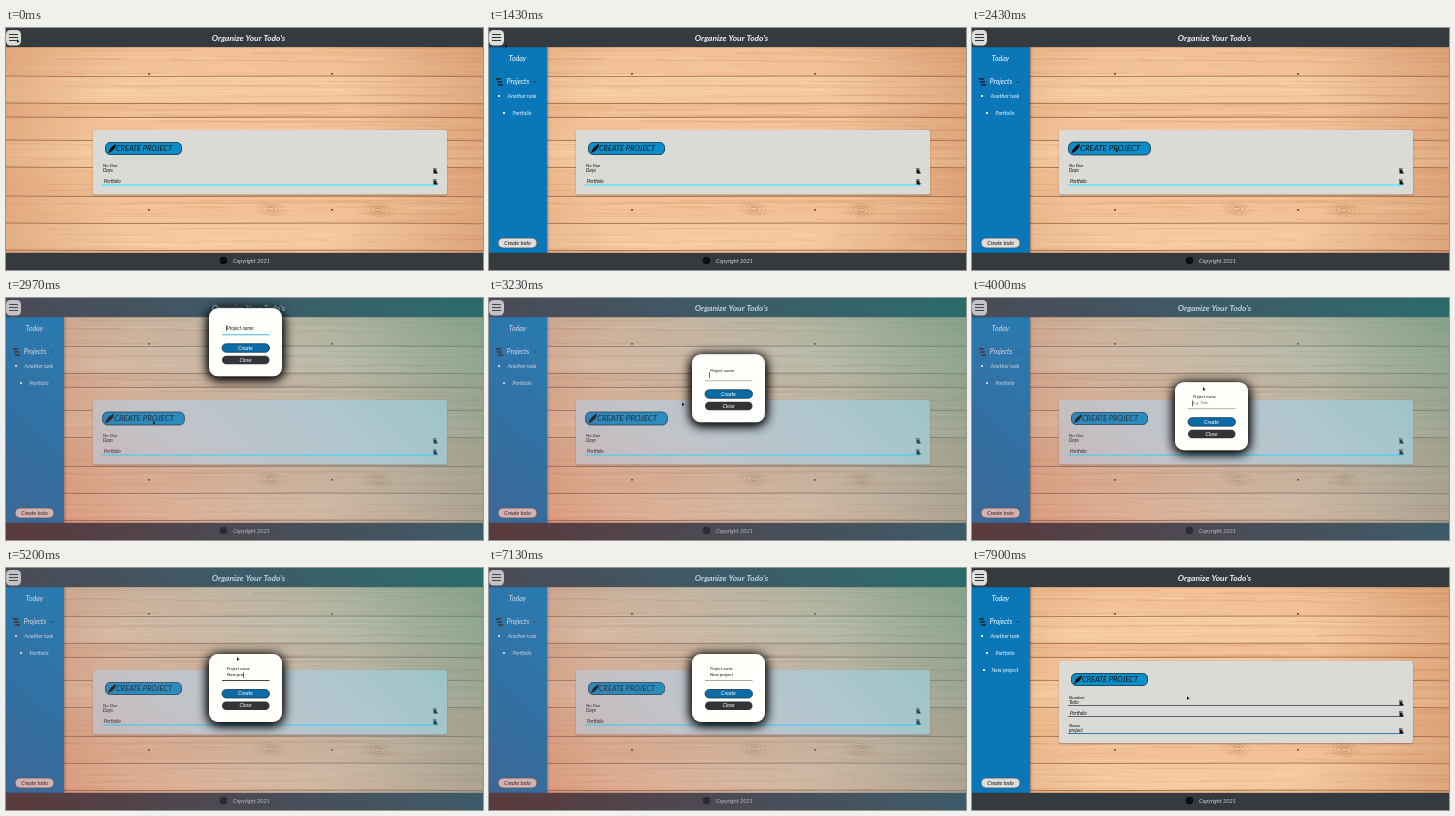
These frames come from a looping animation (477 by 242 pixels, 8000 ms). An HTML page with a canvas:

```html
<!DOCTYPE html>
<html lang="en">
<head>
<meta charset="utf-8">
<title>Todo list</title>
<style>
html, body { margin: 0; width: 100%; height: 100%; overflow: hidden; background: #343a3e; }
canvas { display: block; width: 477px; height: 242px; }
</style>
</head>
<body>
<canvas id="stage" width="477" height="242"></canvas>
<script>
const W = 477, H = 242, LOOP = 8000;
const SAVED = 7200; // the new project appears and the dialog closes
const c = document.getElementById('stage').getContext('2d');

const clamp = x => Math.max(0, Math.min(1, x));
const part = (t, a, b) => clamp((t - a) / (b - a));
const smooth = x => x * x * (3 - 2 * x);
const mix = (a, b, p) => a + (b - a) * p;

function rect(x, y, w, h, color) {
  c.fillStyle = color;
  c.fillRect(x, y, w, h);
}

function pill(x, y, w, h, r, fill, stroke) {
  c.beginPath();
  c.roundRect(x, y, w, h, r);
  c.fillStyle = fill;
  c.fill();
  if (stroke) {
    c.strokeStyle = stroke;
    c.lineWidth = .8;
    c.stroke();
  }
}

function text(s, x, y, size, color, align = 'left', weight = 400) {
  c.font = `italic ${weight} ${size}px Lato, "Open Sans", sans-serif`;
  c.textAlign = align;
  c.textBaseline = 'middle';
  c.fillStyle = color;
  c.fillText(s, x, y);
}

function shadow(color, blur, y = 0) {
  c.shadowColor = color;
  c.shadowBlur = blur;
  c.shadowOffsetY = y;
}

function makeWood() {
  const board = document.createElement('canvas');
  board.width = W;
  board.height = H;
  const g = board.getContext('2d');
  let seed = 11;
  const rnd = () => (seed = seed * 16807 % 2147483647) / 2147483647;
  const seams = [14, 48, 75, 89, 112, 139, 168, 195, 222, 242];
  const tones = ['#f2c296', '#f5c99e', '#f0be92'];
  for (let i = 0; i < seams.length - 1; i++) {
    const y = seams[i], h = seams[i + 1] - y;
    g.fillStyle = tones[i % 3];
    g.fillRect(0, y, W, h);
    for (let k = 0; k < h; k++) {
      const gy = y + rnd() * h, x = rnd() * W - 60, len = 60 + rnd() * 220;
      g.strokeStyle = rnd() < .5 ? 'rgba(200,130,85,.2)' : 'rgba(255,225,190,.25)';
      g.lineWidth = .5 + rnd();
      g.beginPath();
      g.moveTo(x, gy);
      g.bezierCurveTo(x + len / 3, gy + rnd() * 5 - 2.5, x + len * .7, gy + rnd() * 5 - 2.5, x + len, gy);
      g.stroke();
    }
  }
  g.strokeStyle = 'rgba(110,65,40,.7)';
  g.lineWidth = .8;
  for (const y of seams.slice(1, -1)) {
    g.beginPath();
    g.moveTo(0, y);
    g.bezierCurveTo(150, y + 1.5, 320, y - 1, W, y + .8);
    g.stroke();
  }
  for (const [x, y] of [[265, 181], [372, 182]])
    for (let r = 1; r < 5; r++) {
      g.strokeStyle = `rgba(160,95,55,${.65 - r * .12})`;
      g.beginPath();
      g.ellipse(x, y, r * 4, r * 1.6, .08, 0, 7);
      g.stroke();
    }
  g.fillStyle = '#6a4a35';
  for (const y of [45, 181])
    for (const x of [143, 326]) g.fillRect(x - 1, y, 2, 1.6);
  // the boards darken towards the edges
  const edge = g.createRadialGradient(225, 120, 130, 225, 120, 300);
  edge.addColorStop(0, 'rgba(170,90,50,0)');
  edge.addColorStop(1, 'rgba(170,90,50,.38)');
  g.fillStyle = edge;
  g.fillRect(0, 0, W, H);
  return board;
}

function trash(x, y) {
  rect(x - 2, y - 2.5, 3.5, 1, '#111');
  rect(x - 1.5, y - 1, 3, 3.5, '#111');
  rect(x + 1, y + 1, 1.5, 1.5, '#111');
}

function row(label, value, y, line, thick = 1) {
  if (label) text(label, 97, y - 7, 4.6, '#111');
  text(value, label ? 97 : 98, y - 2, 4.8, '#111');
  if (line) rect(96, y, 335, thick, line);
  trash(429, y - 2);
}

function createButton(y, scale) {
  c.save();
  c.translate(137.5, y);
  c.scale(scale, scale);
  pill(-38, -6, 76, 12, 4.5, '#0c8fc8', '#15303d');
  c.beginPath();
  c.moveTo(-35, 4);
  c.quadraticCurveTo(-34, -1, -28, -4);
  c.quadraticCurveTo(-28, 1, -35, 4);
  c.fillStyle = c.strokeStyle = '#0a0a0a';
  c.fill();
  c.stroke();
  text('CREATE PROJECT', .5, .3, 7.4, '#0a1218', 'center');
  c.restore();
}

function panel(saved, hover) {
  c.save();
  shadow('rgba(60,30,10,.35)', 2, 1);
  const top = saved ? 93 : 102;
  pill(87, top, 354, saved ? 82 : 64.5, 2, '#dadbd7');
  c.restore();
  createButton(top + 18.5, hover ? 1.075 : 1);
  if (saved) {
    row('Number', 'Todo', 137, '#56636c');
    row('', 'Portfolio', 148, '#56636c');
    row('Name', 'project', 165, '#2c7fae');
  } else {
    row('No Due', 'Days', 145);
    row('', 'Portfolio', 156, '#79e3fa', 2);
  }
}

function sidebar(x, saved) {
  if (x <= -58) return;
  c.save();
  c.translate(x, 0);
  shadow('rgba(0,0,0,.6)', 3);
  rect(0, 19, 58, 206, '#0a78b8');
  shadow('transparent', 0);
  text('Today', 28.5, 30.5, 7, '#fff', 'center');
  for (let i = 0; i < 3; i++) rect(7 + i, 50 + i * 3, 5, 2, '#1d3442');
  text('Projects', 29, 54, 6.8, '#fff', 'center');
  rect(44.5, 53.5, 3, 1, '#143a52');
  const items = [['Another task', 10, 68], ['Portfolio', 15, 85]];
  if (saved) items.push(['New project', 12, 102]);
  for (const [s, dot, y] of items) {
    rect(dot - 1, y - 1, 2, 2, '#e8f2f8');
    text(s, 33, y, 5.4, '#f2f8fc', 'center');
  }
  pill(9, 210, 39, 10, 5, '#deddd9', '#38596c');
  text('Create todo', 28.5, 215, 5.4, '#111', 'center');
  c.restore();
}

function bars() {
  c.save();
  shadow('rgba(0,0,0,.5)', 1.5);
  rect(0, 0, W, 19, '#343a3e');
  rect(0, 225, W, 17, '#343a3e');
  c.restore();
  text("Organize Your Todo's", 242.5, 10.5, 8.4, '#f4f4f2', 'center', 700);
  pill(0, 2, 15, 15.5, 4.5, '#dcdcd8');
  for (const y of [7, 10, 13]) rect(3, y - 1, 9, 1, '#333');
  c.beginPath();
  c.arc(217.5, 232.5, 3.8, 0, 7);
  c.fillStyle = '#0c0e0f';
  c.fill();
  text('Copyright 2021', 227, 233.5, 5.6, '#d2d2d0');
}

function overlay(alpha) {
  const g = c.createLinearGradient(80, 300, 400, -40);
  g.addColorStop(0, 'rgba(185,60,60,.28)');
  g.addColorStop(.4, 'rgba(125,130,160,.27)');
  g.addColorStop(.65, 'rgba(85,155,190,.32)');
  g.addColorStop(1, 'rgba(35,165,160,.45)');
  c.save();
  c.globalAlpha = alpha;
  rect(0, 0, W, H, g);
  c.restore();
}

const keys = [4300, 4430, 4600, 4750, 5000, 5100, 5200, 5300, 5500, 5700, 5900];

function dialog(t) {
  const top = t > 4100 ? 86 : 86 - 76 * Math.exp((2970 - t) / 278);
  if (top < -100) return;
  c.save();
  c.translate(0, top);
  c.save();
  shadow('#000', 12, 2);
  for (let i = 0; i < 2; i++) pill(203, 0, 73, 68, 9, '#fffffb');
  c.restore();

  const lift = smooth(part(t, 3050, 3350));
  const left = t >= 6200;
  text('Project name', 221, mix(20, 15, lift), mix(4.9, 4.2, lift), '#222');
  const typed = 'New project'.slice(0, keys.filter(k => t >= k).length);
  if (typed) text(typed, 221, 21, 4.6, '#111');
  else if (lift === 1) text('e.g. Todo', 221, 21, 4.2, '#777');
  if (!left) {
    const w = typed ? c.measureText(typed).width + 1 : 0;
    rect(220 + w, mix(17, 18.5, lift), .7, 5.5, '#222');
  }
  const line = left ? '#a9aaa8' : t < 3200 ? '#45b9e6' : typed ? '#444' : '#b5b49c';
  rect(216, 26, 47.5, 1, line);

  pill(216, 35.5, 47.5, 8.5, 4.3, '#0b6ba7', '#1c3a4d');
  pill(216, 47.5, 47.5, 8.5, 4.3, '#333437');
  text('Create', 239.5, 39.8, 5.4, '#fff', 'center');
  text('Close', 239.5, 51.8, 5.4, '#fff', 'center');
  c.restore();
}

// time, x, y of the pointer
const path = [
  [0, 11, 11], [390, 11, 11], [400, 12, 11], [900, 12, 11], [1400, 16, 16],
  [1750, 16, 16], [2500, 147, 123], [3050, 147, 123], [3390, 231, 89],
  [5900, 231, 89], [6430, 246, 125], [7199, 246, 125], [7200, 224, 132],
  [7700, 224, 132], [7900, 215, 128], [8000, 215, 128]
];

function pointer(t) {
  if (t > 6830 && t < SAVED) return;
  const i = path.findIndex(p => p[0] > t);
  const [t0, x0, y0] = path[i - 1], [t1, x1, y1] = path[i];
  const p = smooth(part(t, t0, t1));
  c.save();
  c.translate(mix(x0, x1, p), mix(y0, y1, p));
  c.beginPath();
  c.moveTo(0, 0);
  c.lineTo(0, 4);
  c.lineTo(1.1, 3);
  c.lineTo(2.6, 2.7);
  c.closePath();
  c.fillStyle = '#111';
  c.fill();
  c.restore();
}

const wood = makeWood();

function draw(now) {
  const t = now % LOOP, saved = t >= SAVED;
  c.drawImage(wood, 0, 0);
  panel(saved, t >= 2400 && t < 3250);
  sidebar(mix(-60, 0, smooth(part(t, 900, 1400))), saved);
  bars();
  if (!saved && t > 2570) {
    overlay(part(t, 2570, 2920));
    dialog(t);
  }
  pointer(t);
}

const start = performance.now();
function tick() {
  draw(Math.max(0, performance.now() - start));
  requestAnimationFrame(tick);
}
tick();
</script>
</body>
</html>
```
